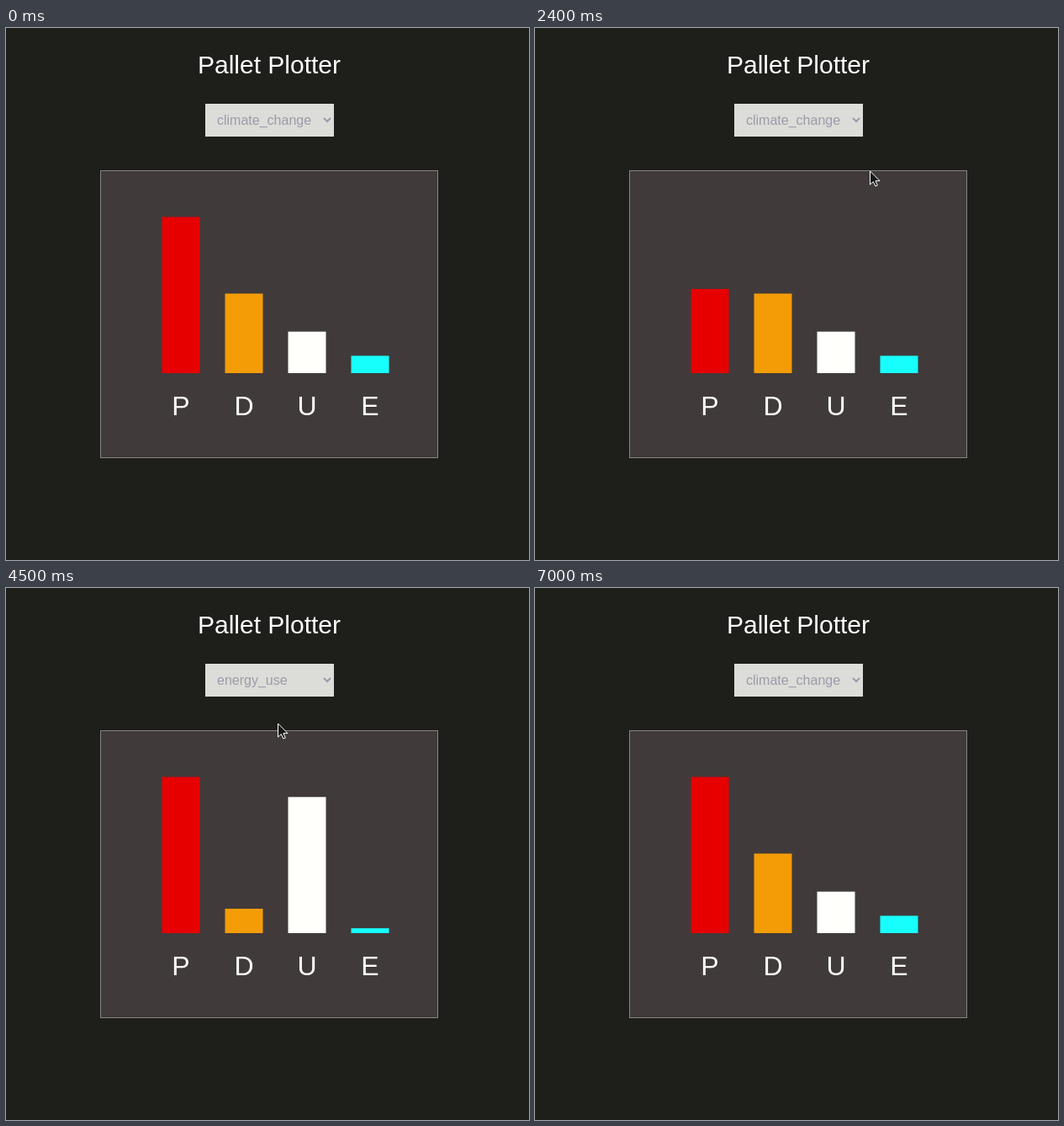
These frames come from a looping animation (622x632 px, 7.4 s). An HTML page with a canvas:

```html
<!DOCTYPE html>
<html lang="en">
<head>
<meta charset="utf-8">
<title>Pallet Plotter</title>
<style>
html, body { margin: 0; height: 100%; overflow: hidden; background: #1e1e1a; }
canvas { display: block; }
</style>
</head>
<body>
<canvas id="stage" width="622" height="632"></canvas>
<script>
const ctx = document.getElementById('stage').getContext('2d');
const LOOP = 7400, TICK = 100;
const GREY = '#9c9aaa', LIGHT = '#dcddd8', PAPER = '#f5f6f1', WHITE = '#fffffc', CYAN = '#17fffd';
const COLORS = ['#e60000', '#f39c06', WHITE, CYAN];
const OPTIONS = [
  { name: 'climate_change', heights: [185.5, 94.5, 49.3, 20.6] },
  { name: 'energy_use', heights: [185.5, 29, 161.7, 5.8] }
];

// pointer glides: end time, number of ticks, where it stops
const MOVES = [
  [1100, 2, 398, 169], [3100, 2, 317, 118], [3400, 2, 323, 114], [4200, 2, 323, 160],
  [5100, 3, 341, 110], [5800, 3, 342, 137], [6600, 3, 171, 1], [6800, 1, 132, -2]
];

const within = (t, from, to) => t >= from && t < to;
const clamp = v => Math.min(1, Math.max(0, v));

function pointerAt(t) {
  let x = 513, y = 195;
  for (const [end, ticks, toX, toY] of MOVES) {
    const k = clamp(1 - (end - t) / (ticks * TICK));
    x += (toX - x) * k;
    y += (toY - y) * k;
  }
  return { x: Math.round(x), y: Math.round(y) };
}

function box(x, y, w, h, color) {
  ctx.fillStyle = color;
  ctx.fillRect(x, y, w, h);
}

function text(str, x, y, size, color, align = 'left') {
  ctx.font = size + 'px "Liberation Sans", Arial, sans-serif';
  ctx.textAlign = align;
  ctx.fillStyle = color;
  ctx.fillText(str, x, y);
}

function arc(from, to, color) {
  ctx.beginPath();
  ctx.arc(313, 341, 31.5, from * Math.PI, to * Math.PI);
  ctx.lineWidth = 7;
  ctx.strokeStyle = color;
  ctx.stroke();
}

function chart(heights, limit) {
  box(112, 169, 402, 342, '#878383');
  box(113, 170, 400, 340, '#403a3a');
  heights.forEach((full, i) => {
    const h = Math.min(full, limit), x = 185.5 + 75 * i;
    box(x, 410 - h, 45, h, COLORS[i]);
    text('PDUE'[i], x + 22.5, 460, 32, '#fff', 'center');
  });
}

function menu(active) {
  ctx.save();
  ctx.shadowColor = 'rgba(0,0,0,.25)';
  ctx.shadowBlur = 16;
  ctx.shadowOffsetY = 4;
  box(237, 129, 153, 43, PAPER);
  ctx.restore();
  box(238, 130 + 20 * active, 151, 21, '#366cf6');
  OPTIONS.forEach(({ name }, i) => text(name, 252, 144 + 20 * i, 16, i === active ? '#fff' : GREY));
}

function select(label) {
  const w = label ? 153 : 40, x = label ? 237 : 293, tip = x + w - 8;
  box(x, 90, w, 39, LIGHT);
  text(label, x + 14, 115, 16, GREY);
  ctx.beginPath();
  ctx.moveTo(tip - 4, 107);
  ctx.lineTo(tip, 111);
  ctx.lineTo(tip + 4, 107);
  ctx.lineWidth = 2;
  ctx.strokeStyle = GREY;
  ctx.stroke();
}

function arrow({ x, y }) {
  ctx.save();
  ctx.translate(x + 0.5, y + 1);
  const shape = new Path2D('M0 0V16L3.8 12.6L6.4 18L8.8 17L6.4 11.6H11.5Z');
  ctx.fillStyle = '#151515';
  ctx.fill(shape);
  ctx.lineWidth = 1;
  ctx.strokeStyle = '#fff';
  ctx.stroke(shape);
  ctx.restore();
}

function draw(t) {
  const loading = within(t, 1900, 2000);
  const chosen = within(t, 4500, 6200) ? 1 : 0;
  const open = within(t, 3600, 4500) || within(t, 5400, 6200);
  const growth = within(t, 1900, 3000) ? (t - 1900) * 0.2 : Infinity;
  const pointer = pointerAt(t);
  const { name, heights } = OPTIONS[chosen];

  box(0, 0, 622, 632, '#1e1e1a');
  text('Pallet Plotter', 313, 54, 30, '#fff', 'center');
  chart(heights, growth);
  if (loading) {
    arc(-0.25, 1.25, '#f3f3f3');
    arc(1.25, 1.75, CYAN);
  }
  if (open) menu(pointer.y < 130 ? chosen : pointer.y < 150 ? 0 : 1);
  select(loading ? '' : name);
  if (within(t, 700, 7000)) arrow(pointer);
}

const start = performance.now();
function loop() {
  const t = (performance.now() - start) % LOOP;
  draw(Math.floor(t / TICK) * TICK);
  requestAnimationFrame(loop);
}
loop();
</script>
</body>
</html>
```
